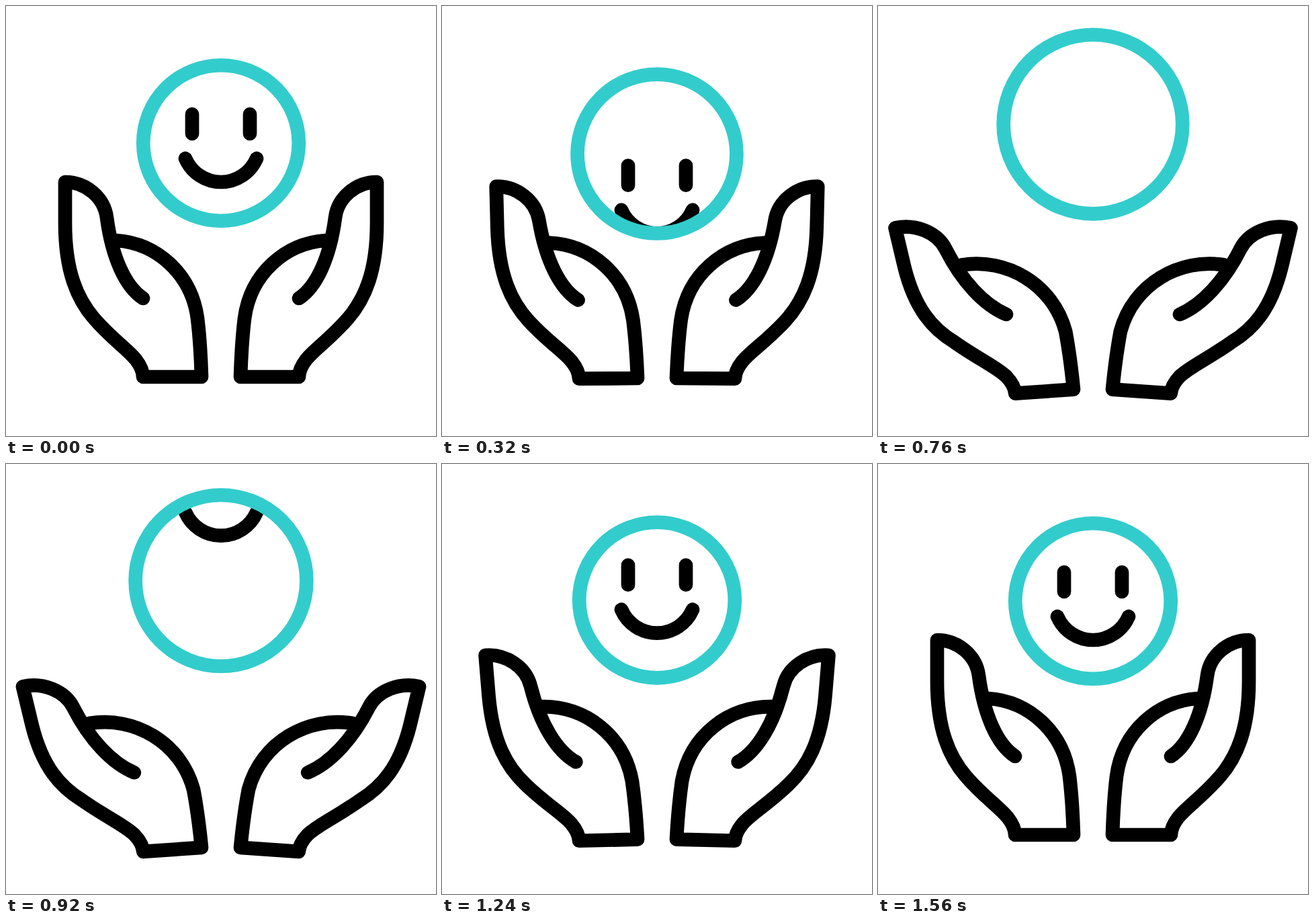
An HTML page that plays this animation: 640 by 640 pixels, repeating every 1720 ms.

```html
<!DOCTYPE html>
<html lang="en">
<head>
<meta charset="utf-8">
<title>Caring hands</title>
<style>
  html, body { margin: 0; width: 100%; height: 100%; overflow: hidden; background: #fff; }
  svg { display: block; width: 100vw; height: 100vh; }
</style>
</head>
<body>
<svg viewBox="0 0 640 640" fill="none" stroke="#000" stroke-width="20.7" stroke-linecap="round" stroke-linejoin="round">
  <defs>
    <clipPath id="inside"><circle id="mask" cx="320"/></clipPath>
  </defs>
  <g clip-path="url(#inside)">
    <path id="face" d="M277 161V190M363 161V190M267 227C276 248 297 262 320 262S364 248 373 227"/>
  </g>
  <circle id="ring" cx="320" stroke="#33cccc"/>
  <path id="left"/>
  <path id="right" transform="matrix(-1 0 0 1 640 0)"/>
</svg>
<script>
const LOOP = 1720, STEP = 40;
const $ = id => document.getElementById(id);
const face = $('face'), left = $('left'), right = $('right');
const circles = [$('ring'), $('mask')];

// Left hand at rest: thumb, finger tip, back of the hand, wrist, palm
const HAND = `M204 435 C178 418 158 375 150 315 C146 284 118 262 88 262
  L88 323 C88 395 106 436 131 465 C158 496 180 510 193 526 C200 535 204 543 204 552
  L291 552 C290 520 288 490 285 465 C276 398 224 353 164 349`;
const WRIST = { x: 291, y: 552 };

// Cubic bezier easing with control points (x1, 0) and (x2, 1)
function ease(t, from, to, x1 = 1 / 3, x2 = 2 / 3) {
  const u = Math.min(1, Math.max(0, (t - from) / (to - from)));
  if (u === 0 || u === 1) return u;
  let lo = 0, hi = 1, s = 0.5;
  for (let i = 0; i < 24; i++) {
    const x = 3 * (1 - s) * (1 - s) * s * x1 + 3 * (1 - s) * s * s * x2 + s * s * s;
    if (x < u) lo = s; else hi = s;
    s = (lo + hi) / 2;
  }
  return s * s * (3 - 2 * s);
}

// Swing a point around the wrist: the farther out, the more it turns and stretches
function bend(x, y, k) {
  const dx = WRIST.x - x, dy = WRIST.y - y;
  const dist = Math.hypot(dx, dy);
  const far = ease(dist, 85, 335);
  const r = dist + k * (8 * Math.sin(Math.PI * far) + 4 * far);
  const a = Math.atan2(dy, dx) - k * (0.068 + 0.157 * far);
  return [WRIST.x - r * Math.cos(a), WRIST.y + 18.7 * k - r * Math.sin(a)];
}

const handPath = k => HAND.replace(/(\d+) (\d+)/g, (_, x, y) =>
  bend(+x, +y, k).map(v => v.toFixed(2)).join(' '));

function draw(t) {
  const swing = ease(t, 120, 860, 0.57, 0.43) - ease(t, 860, 1560, 0.5, 0.42);
  const grow = 18.5 * (ease(t, 207, 675) - ease(t, 680, 1260));
  const shift = 21 * ease(t, 60, 440) - 53.5 * ease(t, 440, 830) + 32.5 * ease(t, 850, 1297);
  // The face rolls out at the bottom and comes back in from the top
  const roll = 195 * (t < 720 ? ease(t, 80, 727) : ease(t, 704, 1431, 0.4, 0.2) - 1);

  const d = handPath(1.02 * swing);
  left.setAttribute('d', d);
  right.setAttribute('d', d);
  for (const c of circles) {
    c.setAttribute('cy', 204 + shift);
    c.setAttribute('r', 115.75 + grow);
  }
  face.setAttribute('transform', `translate(0 ${shift + roll})`);
}

const start = performance.now();
function tick() {
  const t = (performance.now() - start) % LOOP;
  draw(Math.floor(t / STEP) * STEP);
  requestAnimationFrame(tick);
}
tick();
</script>
</body>
</html>
```
